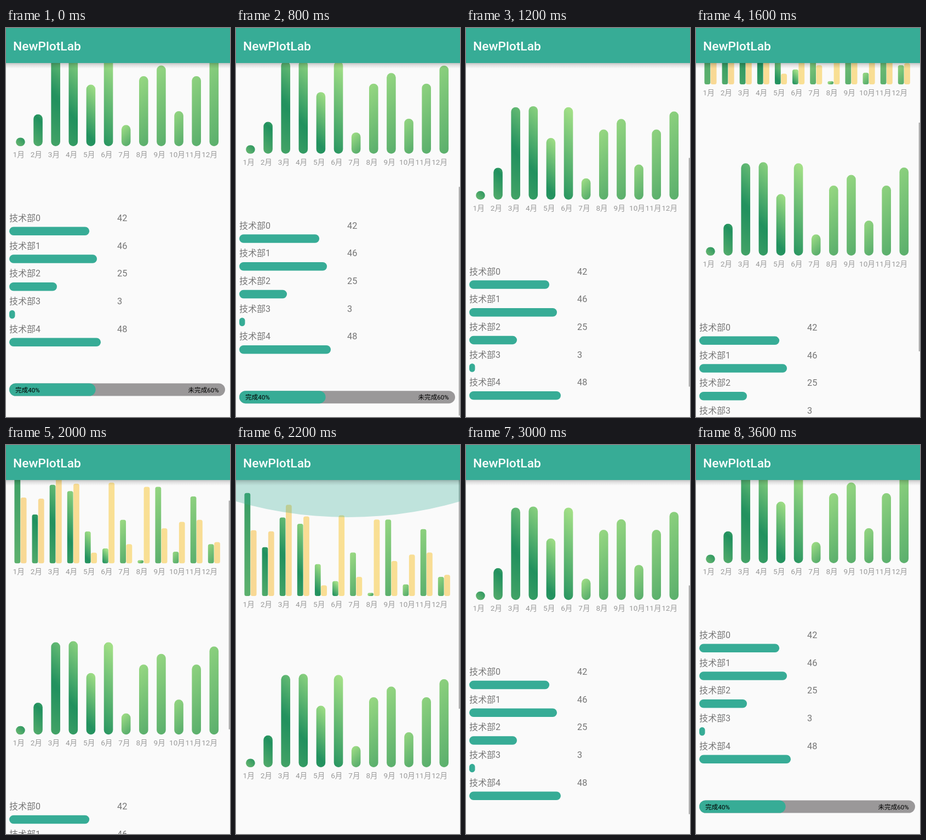
Recreate the animation shown at these times as an HTML page with a canvas. Size 409x711 px, loop 7.5 s.

```html
<!DOCTYPE html>
<html lang="zh-CN">
<head>
<meta charset="utf-8">
<style>
  html, body { margin: 0; width: 100%; height: 100%; overflow: hidden; background: #fafafa; }
  canvas { display: block; }
</style>
</head>
<body>
<canvas id="stage" width="409" height="711"></canvas>
<script>
const W = 409, H = 711, BAR = 64, LOOP = 7500, MAX_SCROLL = 373;
const UNIT = 1.94, STEP = 32.13;
const TEAL = '#37ac96', MEDIUM = [92, 176, 109], DARK = [32, 144, 94], LIGHT = [162, 223, 134];
const FONT = 'Roboto, "Noto Sans CJK SC", "Noto Sans CJK", sans-serif';

// Charted values, one per month or department
const single = [8, 30, 87, 88, 58, 87, 20, 66, 76, 33, 66, 83];
const pairGreen = [97, 46, 74, 68, 30, 14, 41, 3, 72, 11, 63, 18];
const pairYellow = [62, 61, 86, 75, 10, 76, 18, 72, 33, 39, 41, 20];
const staff = [42, 46, 25, 3, 48];

const ctx = document.getElementById('stage').getContext('2d');

const clamp = v => Math.min(1, Math.max(0, v));
const progressOf = (t, from, to) => clamp((t - from) / (to - from));
const bump = (t, from, peak, to) => Math.min(progressOf(t, from, peak), 1 - progressOf(t, peak, to));

// Drag towards the top, then fling back to the bottom
function scrollAt(t) {
  const up = progressOf(t, 700, 2200) ** 1.22;
  const down = progressOf(t, 2400, 3050) ** 2.48;
  return MAX_SCROLL * (up - down);
}

function pill(x, y, w, h, r, fill) {
  ctx.fillStyle = fill;
  ctx.beginPath();
  ctx.roundRect(x, y, w, h, Math.min(r, w / 2, h / 2));
  ctx.fill();
}

function text(str, x, y, size, color, weight = 400) {
  ctx.font = `${weight} ${size}px ${FONT}`;
  ctx.fillStyle = color;
  ctx.fillText(str, x, y);
}

// Green ramp: medium at 0, dark at 1, light at 2, medium again at 4
function green(phase) {
  const mix = (a, b, k) => `rgb(${a.map((v, i) => v + (b[i] - v) * k)})`;
  if (phase < 1) return mix(MEDIUM, DARK, phase);
  if (phase < 2) return mix(DARK, LIGHT, phase - 1);
  return mix(LIGHT, MEDIUM, phase / 2 - 1);
}

// The ramp turns around the middle of the chart, so each half leans its own way
function greenFill(i, x, top, h) {
  const left = i < 6, lean = left ? -h / 2 : h / 2;
  const from = left ? 2 - .056 * (5 - i) ** 2 : 2.3 + .08 * (i - 6);
  const to = left ? .22 * i : 4;
  const gradient = ctx.createLinearGradient(x, top, x + lean, top + h / 2);
  for (let k = 0; k <= 16; k++) gradient.addColorStop(k / 16, green(from + (to - from) * k / 16));
  return gradient;
}

function yellowFill() {
  const gradient = ctx.createLinearGradient(0, 0, W, 0);
  gradient.addColorStop(0, '#f8d795');
  gradient.addColorStop(.5, '#f9e094');
  gradient.addColorStop(1, '#f8dc94');
  return gradient;
}

function bars(values, left, base, w, r, fill) {
  values.forEach((value, i) => {
    const x = left + STEP * i, h = value * UNIT;
    pill(x, base - h, w, h, r, fill(i, x + w / 2, base - h, h));
  });
}

// Two-digit labels stand closer together
function monthLabels(base) {
  for (let i = 0; i < 12; i++)
    text(i + 1 + '月', i < 9 ? 12.5 + STEP * i : 298 + 29.6 * (i - 9), base + 20, 13.6, '#999');
}

function staffRows(top) {
  staff.forEach((value, i) => {
    const y = top + 50.7 * i;
    text('技术部' + i, 6, y, 16, '#757575');
    text(value, 203, y, 16.3, '#757575');
    pill(6, y + 10.7, value * 3.48, 15.5, 7.75, TEAL);
  });
}

function progressBar(y) {
  pill(6, y, 394, 23, 11.5, '#9a9899');
  pill(6, y, 394 * .4, 23, 11.5, TEAL);
  text('完成40%', 17, y + 16.2, 11.6, '#000');
  text('未完成60%', 332.5, y + 16.2, 11.6, '#000');
}

function glow(edge, scale) {
  if (scale <= 0) return;
  ctx.save();
  ctx.translate(W / 2, edge);
  ctx.scale(1, edge === H ? -scale : scale);
  ctx.globalAlpha = .3;
  ctx.fillStyle = TEAL;
  ctx.beginPath();
  ctx.arc(0, 82 - 613, 613, 0, 2 * Math.PI);
  ctx.fill();
  ctx.restore();
}

function scrollThumb(shift, alpha) {
  ctx.globalAlpha = alpha;
  ctx.fillStyle = '#b0b0b0';
  ctx.fillRect(W - 2.3, BAR + (MAX_SCROLL - shift) * .63, 2.3, 418);
  ctx.globalAlpha = 1;
}

function header() {
  const shadow = ctx.createLinearGradient(0, BAR, 0, BAR + 10);
  shadow.addColorStop(0, 'rgba(0,0,0,.22)');
  shadow.addColorStop(.4, 'rgba(0,0,0,.1)');
  shadow.addColorStop(1, 'rgba(0,0,0,0)');
  ctx.fillStyle = shadow;
  ctx.fillRect(0, BAR, W, 10);
  ctx.fillStyle = TEAL;
  ctx.fillRect(0, 0, W, BAR);
  text('NewPlotLab', 13, 41, 22.8, '#fff', 500);
}

function draw(t) {
  const shift = scrollAt(t), pairBase = shift - 97, singleBase = shift + 216;
  ctx.fillStyle = '#fafafa';
  ctx.fillRect(0, 0, W, H);

  bars(pairGreen, 15.4, pairBase, 10.8, 3.5, greenFill);
  bars(pairYellow, 26.7, pairBase, 10.8, 3.5, yellowFill);
  monthLabels(pairBase);
  bars(single, 18.1, singleBase, 16.6, 8.3, greenFill);
  monthLabels(singleBase);
  staffRows(shift + 352.9);
  progressBar(shift + 649.5);

  scrollThumb(shift, bump(t, 700, 800, 800) || 1 - progressOf(t, 3300, 3600) * (t >= 800) - (t < 800));
  glow(BAR, .83 * bump(t, 2050, 2200, 2500));
  glow(H, .46 * bump(t, 3000, 3100, 3200));
  header();
}

// The picture advances in 100 ms steps
const start = performance.now();
function tick(now) {
  draw(Math.floor(Math.max(0, now - start) % LOOP / 100) * 100);
  requestAnimationFrame(tick);
}
tick(start);
</script>
</body>
</html>
```
